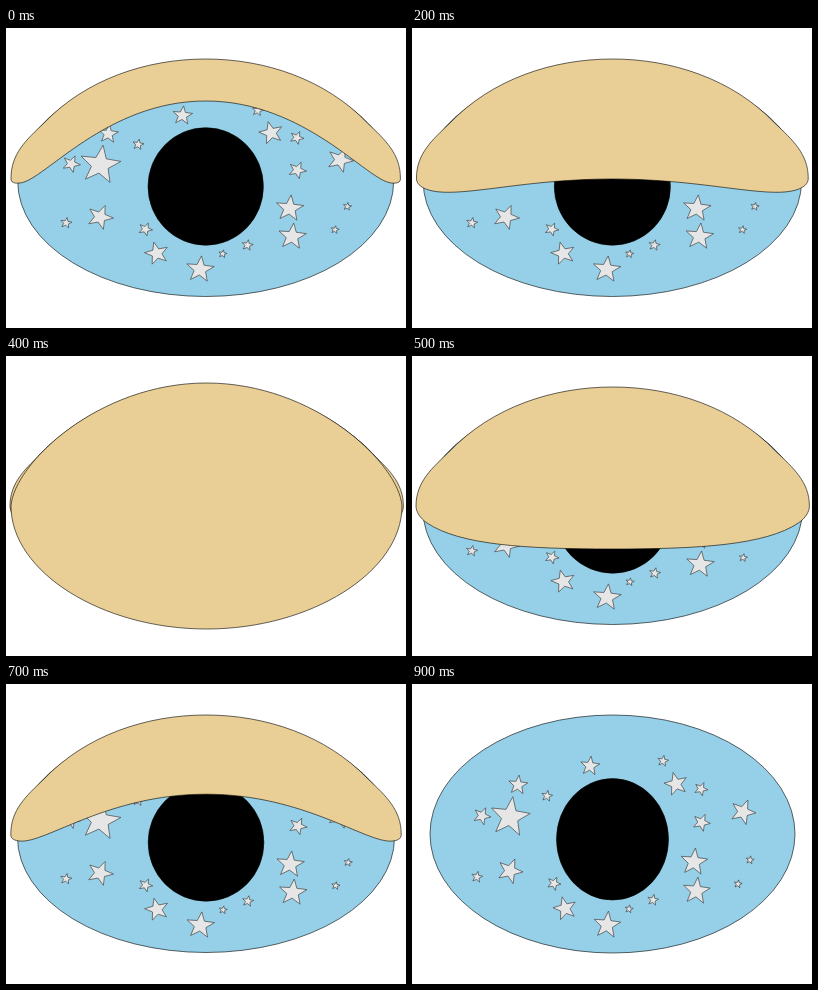
Write an HTML page that moves like this. It is 400 by 300 pixels and loops after 1 s.

```html
<!DOCTYPE html>
<html lang="en">
<head>
<meta charset="utf-8">
<title>Blinking eye</title>
<style>
  html, body { margin: 0; width: 100%; height: 100%; overflow: hidden; background: #fff; }
  svg { display: block; width: 100%; height: 100%; }
  svg * { vector-effect: non-scaling-stroke; }
  #eye, .lid { stroke: #000; stroke-width: .6; }
  #iris { fill: #95d0e8; }
  #stars { fill: #e6e6e6; stroke: #444; stroke-width: .7; }
  .lid { fill: #e9ce95; }
</style>
</head>
<body>
<svg viewBox="0 0 400 300">
  <g id="eye">
    <ellipse id="iris" cx="200.5" cy="150" rx="182.5" ry="119"/>
    <path id="stars"/>
    <ellipse cx="200.5" cy="155.3" rx="56" ry="60.7"/>
  </g>
  <path id="lid" class="lid"/>
  <path id="shut" class="lid"/>
</svg>
<script>
const $ = id => document.getElementById(id);
const lerp = (a, b, t) => a + (b - a) * t;

// Stars of one size and tilt: radius, tilt in degrees, centres
const groups = [
  [20.5, 8, [98, 133]],
  [14, 6, [195, 241], [282, 178], [284.5, 207]],
  [13, 22, [331, 128], [98, 187]],
  [12, -14, [153, 224.5], [264, 100]],
  [10, 6, [106, 101], [178, 82]],
  [9, 24, [289.5, 138.5], [70, 132]],
  [7, 24, [142, 199.5], [289, 105]],
  [5.7, 10, [65, 193], [135, 112], [241, 216], [251, 77]],
  [4.2, 10, [217, 225], [338, 176], [326, 200]]
];

function starPath(r, tilt, [x, y]) {
  const pts = [];
  for (let i = 0; i < 10; i++) {
    const a = (i * 36 - 90 + tilt) * Math.PI / 180;
    const d = i % 2 ? r * .42 : r;
    pts.push([x + d * Math.cos(a), y + d * Math.sin(a)]);
  }
  return 'M' + pts.join('L') + 'Z';
}

// Closes a left half (cubic points up the middle line) with its mirror image.
function outline(top, edge, cx) {
  const flip = pts => pts.map(([x, y]) => [2 * cx - x, y]);
  const over = [...top, ...flip(top.slice(0, -1)).reverse()];
  const under = [...flip(edge.slice(1)), ...edge.slice(0, -1).reverse()];
  return 'M' + over[0] + 'C' + over.slice(1).concat(under).join(' ') + 'Z';
}

// Left half of the lid's rim, raised and lowered; the last point is a handle.
const raised = [[5, 150], [4.5, 155], [9, 155.5], [14, 155], [38, 153], [100, 73]];
const lowered = [[4, 150], [4, 156], [8, 162], [15, 167], [48, 189], [113, 193]];

function lidPath(s, cx) {
  const bend = s ** 1.5;
  const mid = lerp(73, 193, s);
  const rim = raised.map(([x, y], i) =>
    [lerp(x, lowered[i][0], bend), lerp(y, lowered[i][1], bend)]);
  rim[5][1] = mid;
  const brow = [rim[0], [rim[0][0], 126], [20, 112], [38, 95], [80, 51], [141, 31], [cx, 31]];
  return outline(brow, [...rim, [cx, mid]], cx);
}

const shutPath = outline(
  [[5, 150], [8, 108], [92, 27], [200.5, 27]],
  [[5, 150], [5, 216], [96, 273], [200.5, 273]], 200.5);

const OPEN = 5, SHUT = 4;
const drop = [0, .31, .65, 1, 1];
const order = [0, 1, 2, 3, SHUT, 3, 2, 1, 0, OPEN];

function draw(now) {
  const step = order[Math.floor(now % 1000 / 100)];
  const s = drop[step];
  const cx = 199.7 + s;
  const open = step === OPEN;
  $('lid').setAttribute('d', open ? '' : lidPath(s, cx));
  $('shut').setAttribute('d', step === SHUT ? shutPath : '');
  // Under the lid the eyeball widens and flattens onto its lower rim.
  $('eye').setAttribute('transform', open ? '' :
    `translate(${cx} 268.5) scale(${1.03 + s * .01} .968) translate(-200.5 -269)`);
  requestAnimationFrame(draw);
}

$('stars').setAttribute('d', groups.flatMap(([r, tilt, ...centres]) =>
  centres.map(c => starPath(r, tilt, c))).join(''));
draw(performance.now());
</script>
</body>
</html>
```
